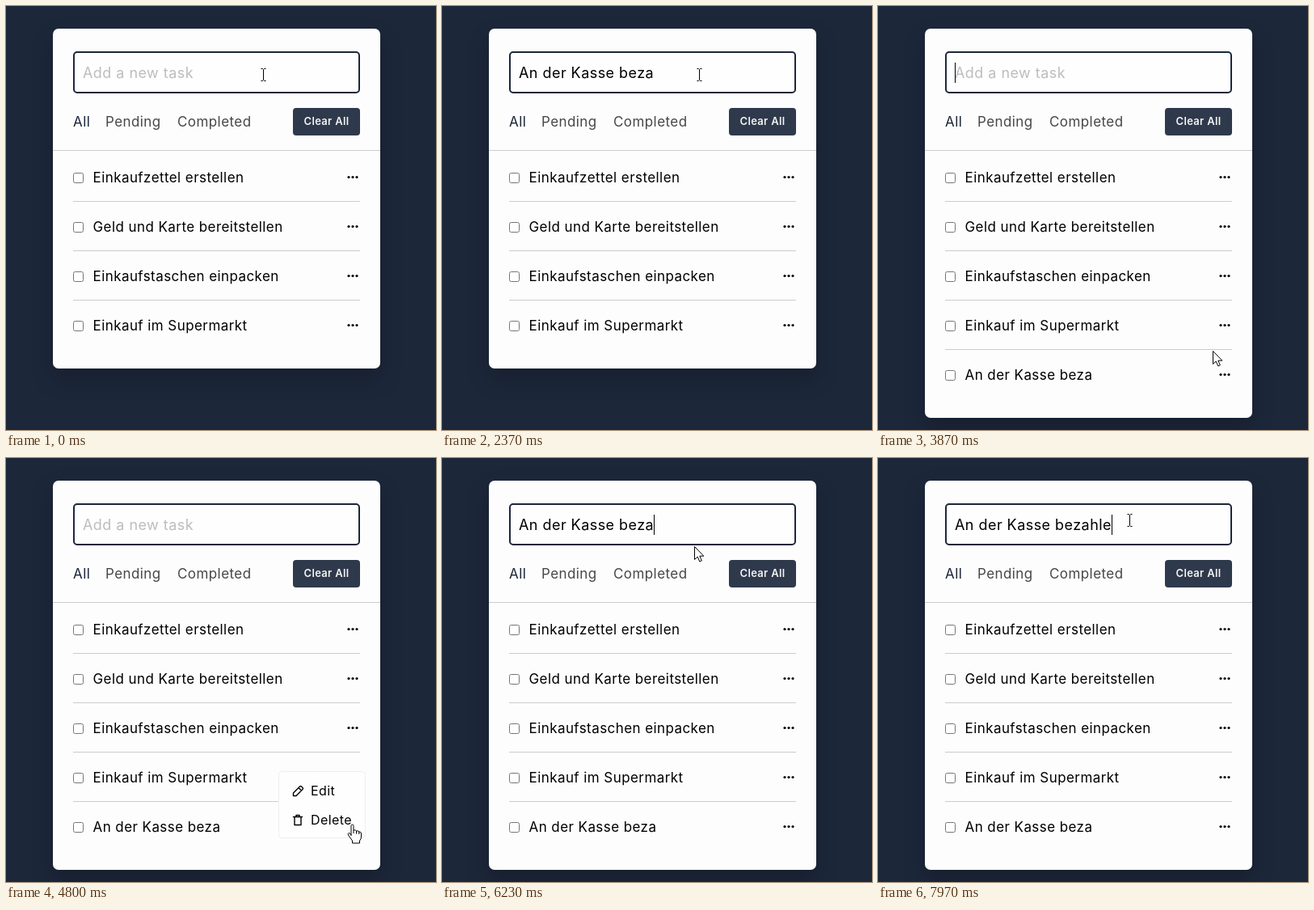
Animation of 532 by 524 pixels, one loop 8000 ms. Source, as an HTML page:

```html
<!DOCTYPE html>
<html lang="de">
<head>
<meta charset="utf-8">
<title>To-do list</title>
<style>
  html, body { margin: 0; width: 100%; height: 100%; overflow: hidden; background: #1c273a; }
  svg { display: block; width: 532px; height: 524px; }
  text { font: 17px Inter, "Open Sans", sans-serif; letter-spacing: .025em; white-space: pre; fill: #000; }
  #card { filter: drop-shadow(0 13px 13px rgba(0, 0, 0, .2)); }
  .field { font-size: 18px; }
  .hint { fill: #bdbdbd; }
  .tab { fill: #474747; }
  .tab.active { fill: #1c273a; }
  .button { font-size: 13px; font-weight: 600; fill: #f4f4f4; }
  .menu-text { font-size: 16px; }
  .line { stroke: #ccc; }
  .box { fill: #fff; stroke: #767676; }
  .icon { fill: none; stroke: #000; stroke-width: 1.4; stroke-linejoin: round; stroke-linecap: round; }
  .pointer { fill: #fff; stroke: #000; stroke-linejoin: round; }
</style>
</head>
<body>
<svg viewBox="0 0 532 524">
  <rect id="card" x="58" y="28" width="405" height="420" rx="7" fill="#fdfdfd"/>
  <rect x="84" y="57" width="353" height="50" rx="4" fill="#fefefe" stroke="#1c273a" stroke-width="2"/>
  <text id="hint" class="field hint" x="95" y="89">Add a new task</text>
  <text id="value" class="field" x="95" y="89"></text>
  <path id="caret" d="M.5 70V95" stroke="#000"/>

  <text class="tab active" x="83" y="149">All</text>
  <text class="tab" x="123" y="149">Pending</text>
  <text class="tab" x="212" y="149">Completed</text>
  <rect x="355" y="126" width="83" height="34" rx="4" fill="#2f394c"/>
  <text class="button" x="396.5" y="147" text-anchor="middle">Clear All</text>
  <path class="line" d="M58 178.5H463"/>
  <g id="rows"></g>

  <g id="menu">
    <rect x="337.5" y="387.5" width="107" height="82" rx="4" fill="#fefefe" stroke="#eee"/>
    <rect id="hover" x="338" y="393" width="106" height="35" fill="#f3f3f3"/>
    <path class="icon" d="M355.5 417.5V414L363.5 406Q364.5 405 365.5 406L367 407.5Q368 408.5 367 409.5L359 417.5ZM362 407.5L365.5 411"/>
    <text class="menu-text" x="377" y="417">Edit</text>
    <path class="icon" d="M355.5 443.5H366.5M359 443V441.5H363V443M357 444V453.5H365V444"/>
    <text class="menu-text" x="377" y="453">Delete</text>
  </g>

  <g id="pointer">
    <path id="arrow" class="pointer" d="M0 0V16L3.7 12.6L6.3 18.5L8.8 17.4L6.3 11.7H11.3Z"/>
    <path id="beam" d="M-3 -7.5H-1L0 -6.5L1 -7.5H3M0 -6.5V6.5M-3 7.5H-1L0 6.5L1 7.5H3" fill="none" stroke="#000"/>
    <path id="hand" class="pointer" d="M-1.5 14V1.5Q-1.5 0 0 0T1.5 1.5V7Q4.5 6 5 8Q8 7.2 8.3 9Q11 8.7 11 11V15Q11 18 9 20V23H0V20L-5 13Q-6 11 -4.5 10.5T-1.5 13M1.5 7V11M5 8V11.5M8.3 9V12"/>
  </g>
</svg>
<script>
const LOOP = 8000;
const FIRST_KEY = 1220, KEY_GAP = 38, ENTER = 2700;
const MENU_OPEN = 4550, EDIT_CLICK = 5850;
const MORE_KEYS = 7400, MORE_GAP = 190;
const DRAFT = 'An der Kasse beza', ADDITION = 'hle';
const TASKS = ['Einkaufzettel erstellen', 'Geld und Karte bereitstellen',
  'Einkaufstaschen einpacken', 'Einkauf im Supermarkt', DRAFT];

// Pointer stops: time, x, y
const PATH = [
  [0, 318.5, 85], [3350, 318.5, 85], [3870, 414.5, 426.5], [4200, 428.5, 453],
  [4850, 428.5, 453], [5300, 416, 420.5], [5870, 416, 420.5],
  [6230, 312.5, 109.5], [6450, 311.5, 77], [LOOP, 311.5, 77]
];

const $ = id => document.getElementById(id);
const show = (id, on) => $(id).style.display = on ? '' : 'none';
const clamp = v => Math.min(1, Math.max(0, v));
const smooth = v => v * v * (3 - 2 * v);

$('rows').innerHTML = TASKS.map((task, i) => `
  <g id="row${i}" transform="translate(0 ${212 + 61 * i})">
    ${i ? '<path class="line" d="M83 -31.5H438"/>' : ''}
    <rect class="box" x="83.5" y="-5.5" width="12" height="12" rx="2"/>
    <text x="107.5" y="6">${task}</text>
    ${[424, 429, 434].map(x => `<circle cx="${x}" cy="-.5" r="1.6"/>`).join('')}
  </g>`).join('');

function pointerAt(t) {
  const i = PATH.findIndex(stop => stop[0] > t);
  const [t0, x0, y0] = PATH[i - 1], [t1, x1, y1] = PATH[i];
  const k = smooth((t - t0) / (t1 - t0));
  return [x0 + (x1 - x0) * k, y0 + (y1 - y0) * k];
}

const typed = (text, t, start, gap) =>
  text.slice(0, Math.max(0, Math.floor((t - start) / gap) + 1));

function fieldText(t) {
  if (t >= EDIT_CLICK) return DRAFT + typed(ADDITION, t, MORE_KEYS, MORE_GAP);
  return t < ENTER ? typed(DRAFT, t, FIRST_KEY, KEY_GAP) : '';
}

// The caret stays solid after each key, then blinks.
function caretOn(t) {
  if (t >= MENU_OPEN && t < EDIT_CLICK) return false;
  const last = t < FIRST_KEY ? -580
    : t < ENTER ? Math.min(t, FIRST_KEY + KEY_GAP * (DRAFT.length - 1))
    : t < EDIT_CLICK ? ENTER
    : t < MORE_KEYS ? EDIT_CLICK
    : Math.min(t, MORE_KEYS + MORE_GAP * (ADDITION.length - 1));
  return Math.floor((t - last) / 500) % 2 === 0;
}

function draw(t) {
  const value = fieldText(t);
  $('value').textContent = value;
  show('hint', !value);
  show('caret', caretOn(t));
  const caretX = 95 + (value ? Math.round($('value').getComputedTextLength()) : 0);
  $('caret').setAttribute('transform', `translate(${caretX} 0)`);

  const added = t >= ENTER;
  show('row4', added);
  $('card').setAttribute('height', added ? 481 : 420);

  const scale = smooth(clamp((t - MENU_OPEN) / 200)) - smooth(clamp((t - EDIT_CLICK) / 200));
  show('menu', scale > 0);
  $('menu').setAttribute('transform', `translate(445 470) scale(${scale}) translate(-445 -470)`);

  const [x, y] = pointerAt(t);
  const inField = x > 83 && x < 438 && y > 56 && y < 108;
  const inMenu = scale > .5 && x > 337 && x < 445 && y > 393 && y < 464;
  const onDots = added && Math.hypot(x - 429, y - 456) < 9;
  const hand = inMenu || onDots;
  show('hover', inMenu && y < 428);
  show('beam', inField);
  show('hand', hand);
  show('arrow', !inField && !hand);
  $('pointer').setAttribute('transform', `translate(${x} ${y})`);
}

const start = performance.now();
function tick() {
  draw((performance.now() - start) % LOOP);
  requestAnimationFrame(tick);
}
tick();
</script>
</body>
</html>
```
